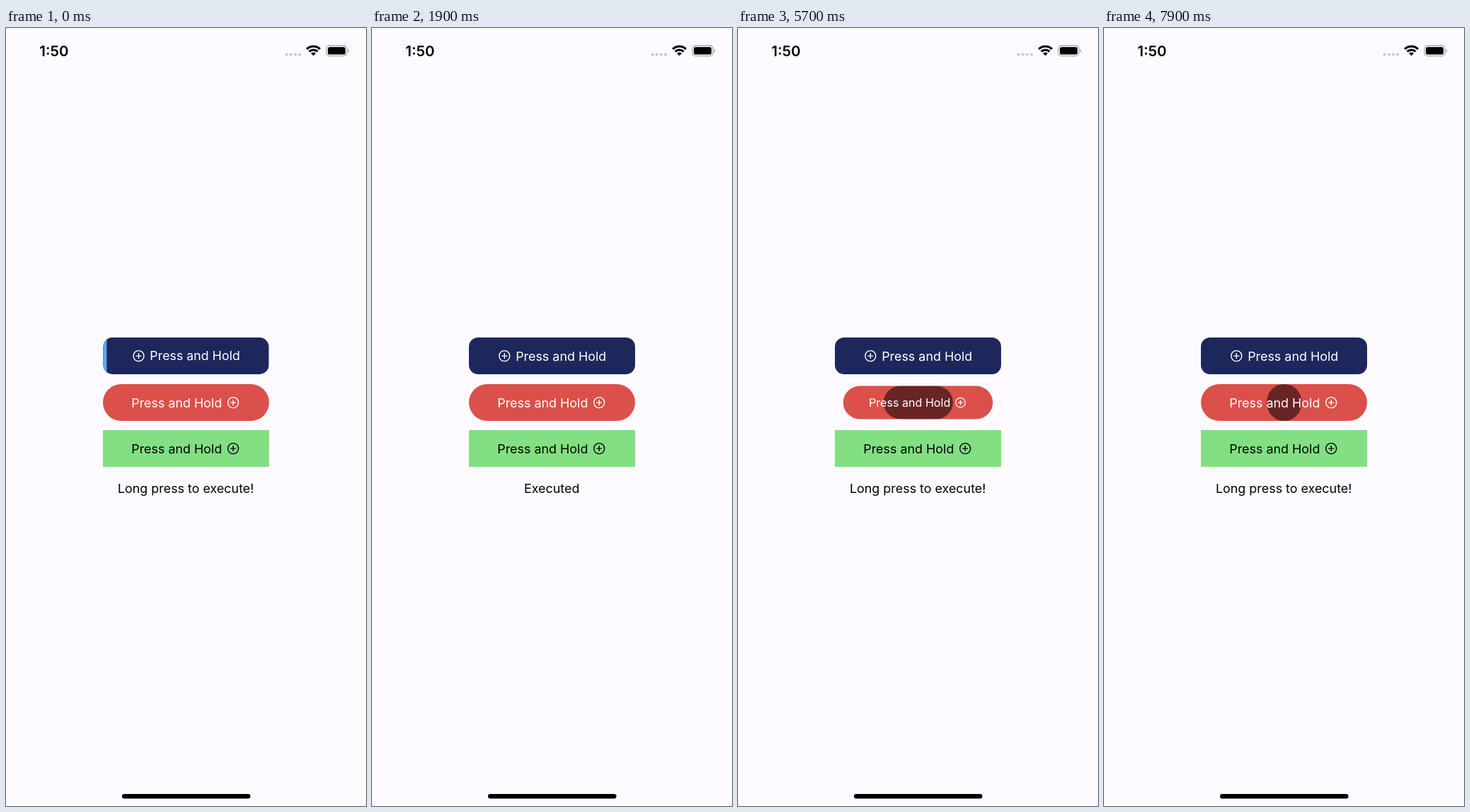
Animation, 509 px wide and 1101 px high, one loop 8 s. Source, as an HTML page:

```html
<!DOCTYPE html>
<html lang="en">
<head>
<meta charset="utf-8">
<title>Press and hold buttons</title>
<style>
  html, body { margin: 0; width: 100%; height: 100%; overflow: hidden; background: #fdfbff; }
  #stage { position: relative; width: 509px; height: 1101px; overflow: hidden; }
  svg { position: absolute; left: 0; top: 0; }
  text { font: 17.9px Inter, "Open Sans", sans-serif; text-anchor: middle; }
  .button {
    position: absolute; left: 137px; width: 235px; height: 52.2px;
    overflow: hidden; border-radius: var(--radius); background: var(--back);
  }
  .fill { position: absolute; top: 0; height: 100%; width: 0; border-radius: var(--radius); background: var(--front); }
  #blue { top: 438.3px; --radius: 13px; --back: #1e275b; --front: #5fa2fa; color: #fff; }
  #red { top: 503.5px; --radius: 26.1px; --back: #db504a; --front: #692426; color: #fff; }
  #green { top: 568.8px; --radius: 0px; --back: #82df82; --front: none; color: #000; }
  #blue .fill { left: 0; }
  #red .fill { left: 50%; transform: translateX(-50%); }
</style>
</head>
<body>
<div id="stage">
  <svg width="509" height="1101">
    <text x="68" y="39.8" style="font-size:20.5px;font-weight:600">1:50</text>
    <g id="dots" fill="#cbc9cd"></g>
    <g id="wifi" fill="none" stroke="#000"></g>
    <rect x="453" y="25" width="29" height="14.6" rx="4.4" fill="none" stroke="#a6a5a8" stroke-width="1.3"/>
    <rect x="455" y="27" width="25" height="10.6" rx="2.7"/>
    <path d="M483.5 29.9q1.8.7 1.8 2.4t-1.8 2.4z" fill="#a6a5a8"/>
    <text id="status" x="254.2" y="657.6"></text>
    <rect x="164" y="1084" width="181.5" height="6.5" rx="3.25"/>
  </svg>
  <div class="button" id="blue"></div>
  <div class="button" id="red"></div>
  <div class="button" id="green"></div>
</div>
<script>
const LOOP = 8000, STEP = 100;
const HOLD = 1660;        // time to fill a button
const SQUEEZE = 250;      // time to shrink or grow back
const EXECUTED = 1500;    // time the message stays
const BLUE_DOWN = -35, RED_DOWN = 4929;

const $ = selector => document.querySelector(selector);
const clamp = v => Math.min(1, Math.max(0, v));
const easeInOut = u => u < 0.5 ? 2 * u * u : 1 - 2 * (1 - u) ** 2;

function label(id, iconX, textX) {
  $(id).innerHTML = `<div class="fill"></div>
    <svg width="235" height="53" fill="currentColor">
      <text x="${textX}" y="32.5">Press and Hold</text>
      <g transform="translate(${iconX} 26.1)" fill="none" stroke="currentColor" stroke-width="1.4">
        <circle r="7.5"/><path d="M-4 0H4M0 -4V4"/>
      </g>
    </svg>`;
}
label('#blue', 50.3, 130.2);
label('#red', 184.2, 104.3);
label('#green', 184.2, 104.3);

$('#dots').innerHTML = [0, 1, 2, 3]
  .map(i => `<circle cx="${396.6 + i * 6.15}" cy="37.5" r="2.1"/>`).join('');

// Each band is a quarter ring around the bottom tip: [radius, thickness]
$('#wifi').innerHTML = [[13.3, 3.2], [8.3, 3.2], [2.4, 4.8]].map(([r, w]) => {
  const d = r * Math.SQRT1_2, y = 39.3 - d;
  return `<path d="M${434.6 - d} ${y}A${r} ${r} 0 0 1 ${434.6 + d} ${y}" stroke-width="${w}"/>`;
}).join('');

function pose(id, t, down, fill) {
  const press = easeInOut(clamp((t - down) / SQUEEZE));
  const release = easeInOut(clamp((t - down - HOLD) / SQUEEZE));
  $(id).style.transform = `scale(${1 - 0.1 * (press - release)})`;
  $(id + ' .fill').style.width = 100 * fill + '%';
}

function draw(t) {
  const blue = (t - BLUE_DOWN) / HOLD;
  const red = (t - RED_DOWN) / HOLD;
  pose('#blue', t, BLUE_DOWN, blue < 1 ? clamp(blue) : 0);
  pose('#red', t, RED_DOWN, clamp(1 - Math.abs(red - 1)));
  const done = t - BLUE_DOWN - HOLD;
  $('#status').textContent = done >= 0 && done < EXECUTED ? 'Executed' : 'Long press to execute!';
}

const start = performance.now();
function tick() {
  const t = (performance.now() - start) % LOOP;
  draw(Math.floor(t / STEP) * STEP);
  requestAnimationFrame(tick);
}
tick();
</script>
</body>
</html>
```
